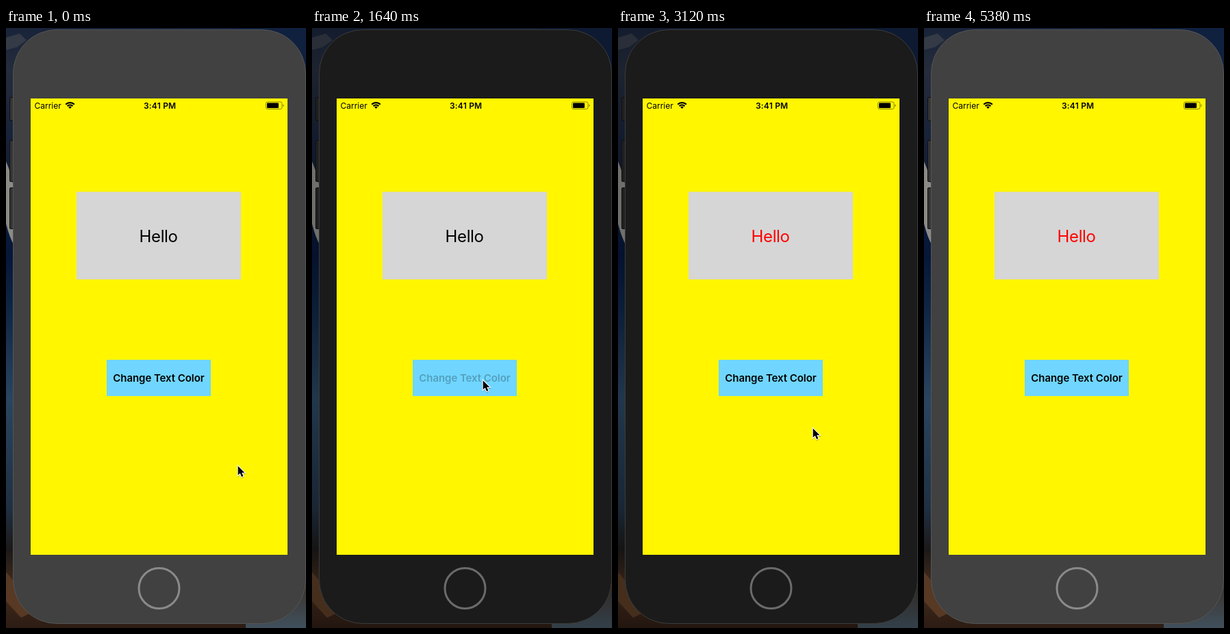
An HTML page that plays this animation: 438 by 877 pixels, repeating every 5480 ms.

```html
<!DOCTYPE html>
<html lang="en">
<head>
<meta charset="utf-8">
<title>Change Text Color</title>
<style>
  html, body { margin: 0; width: 100%; height: 100%; overflow: hidden; background: #0b1a35; }
  svg { display: block; width: 100%; height: 100%; }
  text { font: 12px Inter, Roboto, sans-serif; }
  .mid { text-anchor: middle; }
  .semi { font-weight: 600; }
  #time { letter-spacing: .2px; }
  #hello { font-size: 24px; letter-spacing: -.35px; }
  #label { font-size: 15px; letter-spacing: -.06px; }
  #phone { --body: #414141; --edge: #555; --key: #343434; --ring: #8a8a8a; }
  #phone.active { --body: #1b1b1b; --edge: #3c3c3c; --key: #202020; --ring: #6b6b6b; }
  .body { fill: var(--body); stroke: var(--edge); }
  .keys rect { fill: var(--key); stroke: #101010; }
  .ring { fill: none; stroke: var(--ring); stroke-width: 3; }
  #cursor { stroke: #fff; stroke-width: 2; paint-order: stroke; }
</style>
</head>
<body>
<svg viewBox="0 0 438 877">
  <defs>
    <linearGradient id="sky" x2="0" y2="1">
      <stop offset="0" stop-color="#18233a"/>
      <stop offset=".07" stop-color="#252c3b"/>
      <stop offset=".2" stop-color="#162138"/>
      <stop offset=".38" stop-color="#06173a"/>
      <stop offset=".46" stop-color="#0d2444"/>
      <stop offset=".62" stop-color="#294560"/>
      <stop offset=".8" stop-color="#1f3042"/>
      <stop offset=".87" stop-color="#1c1918"/>
      <stop offset=".93" stop-color="#452c1d"/>
      <stop offset="1" stop-color="#2c1c13"/>
    </linearGradient>
    <linearGradient id="shore" x2="0" y2="1">
      <stop offset="0" stop-color="#3a2c24"/>
      <stop offset="1" stop-color="#40505c"/>
    </linearGradient>
    <filter id="soft" x="-50%" y="-50%" width="200%" height="200%">
      <feDropShadow dx="0" dy="1" stdDeviation=".7" flood-opacity=".35"/>
    </filter>
  </defs>

  <!-- wallpaper -->
  <rect width="438" height="877" fill="url(#sky)"/>
  <path d="M330 0H438V90L400 25Z" fill="#10213f"/>
  <path d="M0 14L20 8 30 18 16 28 0 32Z" fill="#343a46"/>
  <path d="M0 195Q9 215 12 240V318Q5 306 0 286Z" fill="#8b8a85"/>
  <path d="M0 795L14 812 34 856 22 862 0 838Z" fill="#573924"/>
  <path d="M350 870L438 800V877H350Z" fill="url(#shore)"/>
  <rect id="shade" width="438" height="877" opacity=".2"/>

  <g id="phone">
    <g class="keys">
      <rect x="5.5" y="101.5" width="8" height="34" rx="1.5"/>
      <rect x="5.5" y="164.5" width="8" height="60" rx="1.5"/>
      <rect x="5.5" y="233.5" width="8" height="60" rx="1.5"/>
      <rect x="430" y="164.5" width="12" height="60"/>
    </g>
    <rect class="body" x="10.5" y="2.5" width="427" height="868" rx="64"/>
    <circle class="ring" cx="223.5" cy="819" r="29.5"/>
  </g>

  <rect x="36" y="103" width="375" height="667" fill="#fff600"/>

  <!-- status bar -->
  <text x="41.5" y="117.5">Carrier</text>
  <g transform="translate(93.5 118)">
    <path d="M-6.3-6.3A8.9 8.9 0 0 1 6.3-6.3M-3.9-3.9A5.5 5.5 0 0 1 3.9-3.9" fill="none" stroke="#000" stroke-width="2.2"/>
    <path d="M0 0L-2.3-2.3A3.2 3.2 0 0 1 2.3-2.3Z"/>
  </g>
  <text id="time" class="mid semi" x="224.7" y="117.5">3:41 PM</text>
  <rect x="379.5" y="108" width="23.5" height="10.5" rx="2.5" fill="none" stroke="#000" stroke-opacity=".45"/>
  <rect x="381" y="109.5" width="17" height="7.5" rx="1"/>
  <path d="M404.3 111.3Q407 113.3 404.3 115.3Z" opacity=".5"/>

  <rect x="103" y="239.5" width="240" height="128" fill="#d6d6d6"/>
  <text id="hello" class="mid" x="222.6" y="313">Hello</text>
  <rect x="147" y="485" width="152" height="53" fill="#70d6ff"/>
  <text id="label" class="mid semi" x="223" y="517">Change Text Color</text>

  <path id="cursor" d="M0 0V13.4L3.1 10.5 5.3 15.8 7.7 14.8 5.5 9.7H9.6Z" filter="url(#soft)"/>
</svg>
<script>
const LOOP = 5480;
const $ = id => document.getElementById(id);

// [start ms, values...]
const moves = [
  [0, 337, 639], [300, 290, 584], [450, 264, 548], [590, 254, 528],
  [740, 250, 518], [890, 249, 514], [1040, 248, 514],
  [3120, 283, 584], [3260, 308, 630], [3410, 334, 679],
  [3550, 361, 726], [3700, 391, 804]
];
const fades = [[0, 1], [1640, .25], [1780, .4], [1930, .8], [2070, 1]];

const at = (steps, t) => steps.findLast(s => s[0] <= t).slice(1);

function draw(t) {
  const active = t >= 1640 && t < 5380;
  const [x, y] = at(moves, t);
  $("phone").classList.toggle("active", active);
  $("shade").style.display = active ? "" : "none";
  $("hello").setAttribute("fill", t < 1780 ? "#000" : "#f00");
  $("label").setAttribute("opacity", at(fades, t)[0]);
  $("cursor").setAttribute("transform", `translate(${x + 1.7} ${y + 1.2})`);
  $("cursor").style.display = t < 3850 ? "" : "none";
}

const start = performance.now();
function tick() {
  draw((performance.now() - start) % LOOP);
  requestAnimationFrame(tick);
}
tick();
</script>
</body>
</html>
```
